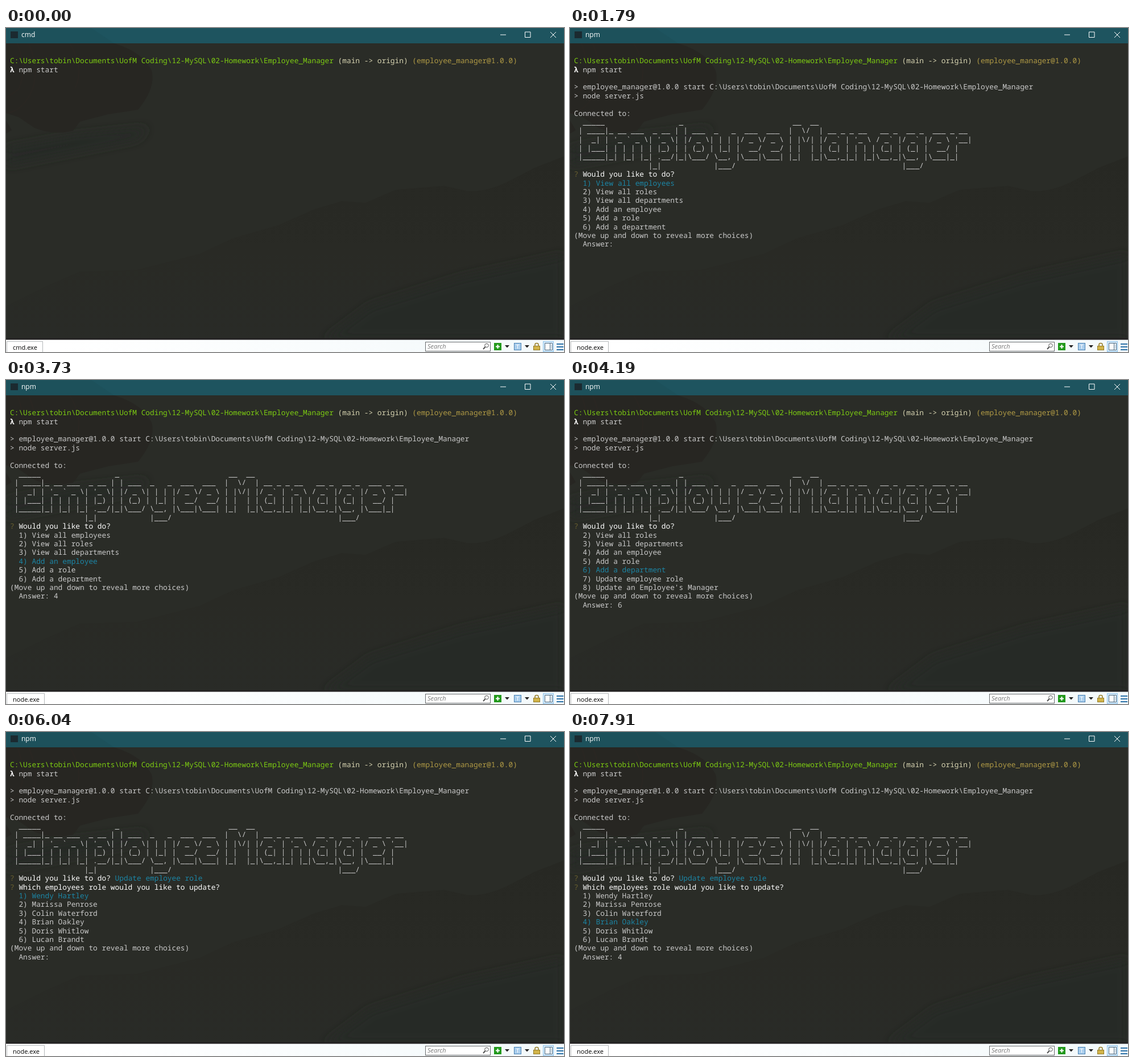
An HTML page for the animation above (8000 ms loop, 981 by 571 pixels).

```html
<!DOCTYPE html>
<html lang="en">
<head>
<meta charset="utf-8">
<title>Terminal</title>
<style>
html, body { margin: 0; width: 100%; height: 100%; overflow: hidden; background: #2a2c27; }
svg { position: absolute; left: 0; top: 0; }
svg text { font: 11px "Open Sans", sans-serif; }
#term { position: absolute; left: 7px; top: 50.2px; color: #cacaca; }
pre { margin: 0; font: 12.82px/15.385px "Noto Sans Mono", monospace; text-rendering: geometricPrecision; }
.path { color: #7ccb12; }
.git { color: #d6d3b0; }
.pkg { color: #b09a45; }
.mark { color: #6b6230; }
.ask { color: #fff; }
.sel { color: #1c86a6; }
</style>
</head>
<body>
<svg width="981" height="571" viewBox="0 0 981 571">
  <defs>
    <linearGradient id="hill" x1="0" y1="0" x2="0" y2="1">
      <stop offset="0" stop-color="#272823"/>
      <stop offset=".5" stop-color="#292a25"/>
      <stop offset="1" stop-color="#292b27"/>
    </linearGradient>
    <linearGradient id="bar">
      <stop offset=".1" stop-color="#fff"/>
      <stop offset="1" stop-color="#f3f9fb"/>
    </linearGradient>
    <filter id="soft" x="-20%" y="-50%" width="140%" height="200%"><feGaussianBlur stdDeviation="9"/></filter>
  </defs>

  <!-- wallpaper -->
  <path fill="#282b28" filter="url(#soft)" d="M0 212 120 190 250 176 230 196 100 222 0 242Z"/>
  <path fill="#272622" d="M0 27H190Q240 42 256 75 264 105 232 144L180 152 130 165 118 181Q85 190 50 176L22 157 0 150Z"/>
  <path fill="none" stroke="#2d2622" d="M40 27Q62 80 42 118 25 148 0 150M20 27Q38 75 22 108L0 124M112 27Q138 70 122 105"/>
  <path fill="#272622" d="M0 163 10 180 0 186Z"/>
  <path fill="url(#hill)" d="M981 226 930 246 880 272Q840 290 810 287L770 278 685 285 632 308 590 305 540 320 480 347 400 370 340 398 230 426 130 429 70 455 0 490V550H981Z"/>
  <path fill="#282b27" filter="url(#soft)" d="M981 400 800 440 640 490 560 550H981Z"/>

  <!-- title bar -->
  <path fill="#1e545f" d="M0 0H981V27H0Z"/>
  <path fill="#1c4e58" d="M0 0H150L190 27H0Z" opacity=".5"/>
  <rect x="8" y="6" width="13" height="12" fill="#1b2a30"/>
  <text id="title" x="27" y="16" fill="#fff" style="font-size:12px"></text>
  <path fill="none" stroke="#fff" d="M869 12H879M912.5 7H922V16.5H912.5ZM957 7 967 17M967 7 957 17"/>

  <!-- status bar -->
  <path fill="#242223" d="M0 546.5H981V550H0Z"/>
  <path fill="url(#bar)" d="M0 549.5H981V571H0Z"/>
  <rect id="tab" x="1.5" y="552.5" height="22" fill="#fff" stroke="#b4b8ba"/>
  <text id="exe" x="12" y="567" fill="#000"></text>
  <rect x="737.5" y="553.5" width="114" height="16" fill="#fff" stroke="#66696b"/>
  <text x="741" y="565" fill="#777" style="font-style:italic">Search</text>
  <g fill="none" stroke="#555">
    <circle cx="845" cy="559.5" r="3.3"/>
    <path stroke-width="2" d="M842.5 562 839 566"/>
  </g>
  <rect x="858" y="555" width="13" height="13" fill="#22991c"/>
  <path stroke="#fff" stroke-width="2" d="M861 561.5H868M864.5 558V565"/>
  <path fill="#222" d="M877 559H885L881 563.5ZM912 559H920L916 563.5Z"/>
  <rect x="893.5" y="555.5" width="12" height="12" fill="#a9cdec" stroke="#4a82b4"/>
  <path fill="none" stroke="#fff" d="M897 558.5H902M899.5 558V565"/>
  <path fill="none" stroke="#9b8330" stroke-width="1.6" d="M930 561V558Q930 555.5 933 555.5T936 558V561"/>
  <rect x="927.5" y="560.5" width="11" height="7" fill="#d2b449" stroke="#927a28"/>
  <rect x="944.5" y="552.5" width="18" height="18" fill="#d5eafa" stroke="#8fc3ea"/>
  <path fill="#fff" stroke="#4b6980" d="M947.5 555.5H960.5V567.5H947.5ZM956.5 555.5V567.5"/>
  <path stroke="#6f9abd" stroke-dasharray="1" d="M958.5 558V566"/>
  <path stroke="#2d72a8" stroke-width="2" d="M968 557H980M968 562H980M968 567H980"/>
</svg>

<div id="term">
<pre><span class="path">C:\Users\tobin\Documents\UofM Coding\12-MySQL\02-Homework\Employee_Manager</span> <span class="git">(main -> origin)</span> <span class="pkg">(employee_manager@1.0.0)</span>
<b class="ask">λ</b> npm start
</pre>
<pre data-at="1240">
 
> employee_manager@1.0.0 start C:\Users\tobin\Documents\UofM Coding\12-MySQL\02-Homework\Employee_Manager
> node server.js
</pre>
<pre data-at="1700">
 
Connected to:
</pre>
<pre data-at="1790">
  _____                 _                         __  __
 | ____|_ __ ___  _ __ | | ___  _   _  ___  ___  |  \/  | __ _ _ __   __ _  __ _  ___ _ __
 |  _| | '_ ` _ \| '_ \| |/ _ \| | | |/ _ \/ _ \ | |\/| |/ _` | '_ \ / _` |/ _` |/ _ \ '__|
 | |___| | | | | | |_) | | (_) | |_| |  __/  __/ | |  | | (_| | | | | (_| | (_| |  __/ |
 |_____|_| |_| |_| .__/|_|\___/ \__, |\___|\___| |_|  |_|\__,_|_| |_|\__,_|\__, |\___|_|
                 |_|            |___/                                      |___/
</pre>
<pre id="menu" data-at="1790"></pre>
</div>

<script>
const LOOP = 8000;
const ACTIONS = ["View all employees", "View all roles", "View all departments", "Add an employee",
  "Add a role", "Add a department", "Update employee role", "Update an Employee's Manager",
  "View employees by manager"];
const STAFF = ["Wendy Hartley", "Marissa Penrose", "Colin Waterford", "Brian Oakley",
  "Doris Whitlow", "Lucan Brandt"];
// Times at which the highlight moves down one choice
const ACTION_KEYS = [3180, 3500, 3730, 3960, 4190, 4500];
const STAFF_KEYS = [7430, 7600, 7910];
const STAFF_AT = 6040;

const $ = id => document.getElementById(id);
const span = (cls, text) => `<span class="${cls}">${text}</span>`;
const ask = text => span("mark", "?") + " " + span("ask", text);
const blocks = document.querySelectorAll("[data-at]");

function list(items, keys, t) {
  const moves = keys.filter(k => t >= k).length;
  const top = Math.max(0, moves - 4);
  const rows = items.slice(top, top + (moves < 4 ? 6 : 7)).map((item, i) => {
    const n = top + i, row = `${n + 1}) ${item}`;
    return "  " + (n === moves ? span("sel", row) : row);
  });
  return [...rows, "(Move up and down to reveal more choices)", "  Answer: " + (moves ? moves + 1 : "")];
}

function menu(t) {
  const first = ask("Would you like to do?");
  const lines = t < STAFF_AT
    ? [first, ...list(ACTIONS, ACTION_KEYS, t)]
    : [first + " " + span("sel", ACTIONS[6]), ask("Which employees role would you like to update?"),
       ...list(STAFF, STAFF_KEYS, t)];
  return lines.join("\n");
}

let shown = "";
function draw(now) {
  const t = now % LOOP;
  for (const b of blocks) b.hidden = t < b.dataset.at;
  $("title").textContent = t < 780 ? "cmd" : "npm";
  $("exe").textContent = t < 1320 ? "cmd.exe" : "node.exe";
  $("tab").setAttribute("width", t < 1320 ? 63 : 66);
  const html = menu(t);
  if (html !== shown) $("menu").innerHTML = shown = html;
  requestAnimationFrame(draw);
}
draw(performance.now());
</script>
</body>
</html>
```
